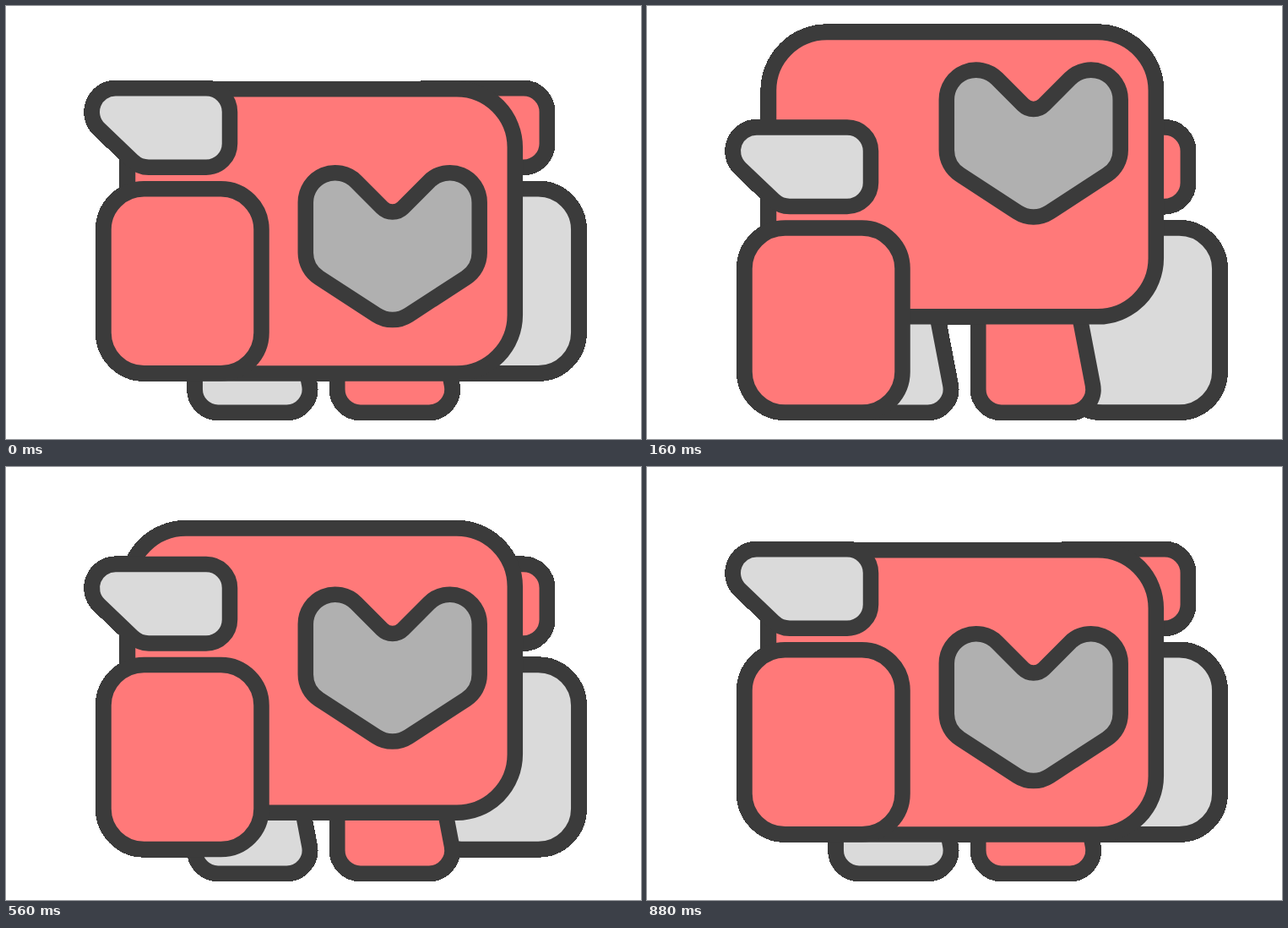
Write an HTML page that moves like this. It is 752x512 px and loops after 1000 ms.

```html
<!DOCTYPE html>
<html lang="en">
<head>
<meta charset="utf-8">
<title>Robot squash and stretch</title>
<style>
  html, body { margin: 0; width: 100%; height: 100%; overflow: hidden; background: #fff; }
  svg { display: block; width: 100vw; height: 100vh; }
</style>
</head>
<body>
<svg viewBox="0 0 752 512">
  <!-- Hard outer silhouette, smooth inner edges -->
  <filter id="hardEdge" filterUnits="userSpaceOnUse" x="0" y="0" width="752" height="512"
          color-interpolation-filters="sRGB">
    <feComponentTransfer><feFuncA type="linear" slope="20" intercept="-1.5"/></feComponentTransfer>
  </filter>
  <g id="robot" filter="url(#hardEdge)" stroke="#3b3b3b" stroke-width="18.5"></g>
</svg>
<script>
const RED = '#ff7979', LIGHT = '#dadada', MID = '#b0b0b0';
const LOOP = 1000, STEP = 40, RELEASE = 513;
const DAMPING = .028, SWING = .0245;

const robot = document.getElementById('robot');
const groups = [];

const svg = name => document.createElementNS(robot.namespaceURI, name);

function toward(from, to) {
  const dx = to[0] - from[0], dy = to[1] - from[1], d = Math.hypot(dx, dy);
  return [dx / d, dy / d];
}

// Closed path through points [x, y, radius?] with rounded corners
function roundPath(points, radius) {
  const n = points.length;
  return points.map((p, i) => {
    const a = toward(p, points[(i + n - 1) % n]);
    const b = toward(p, points[(i + 1) % n]);
    const r = p[2] ?? radius;
    const cut = r / Math.tan(Math.acos(a[0] * b[0] + a[1] * b[1]) / 2);
    const at = u => `${p[0] + u[0] * cut} ${p[1] + u[1] * cut}`;
    const sweep = a[0] * b[1] < a[1] * b[0] ? 1 : 0;
    return `${i ? 'L' : 'M'}${at(a)}A${r} ${r} 0 0 ${sweep} ${at(b)}`;
  }).join('') + 'Z';
}

const box = (x, y, w, h) => [[x, y], [x + w, y], [x + w, y + h], [x, y + h]];
const arm = x => box(x, 216.3, 187, 218);
const leg = x => [[x, 335, 0], [x + 113.9, 335, 0], [x + 141.9, 480.7], [x, 480.7]];

function heart(cx, half, top, side, tip) {
  return [
    [cx - half, top], [cx, top + half, 17.3], [cx + half, top],
    [cx + half, side], [cx, tip], [cx - half, side]
  ];
}

// travel: vertical move in pixels from squashed to stretched
function group(travel, ...shapes) {
  const g = svg('g');
  for (const [points, radius, fill] of shapes) {
    const path = svg('path');
    path.setAttribute('d', roundPath(points, radius));
    path.setAttribute('fill', fill);
    g.append(path);
  }
  robot.append(g);
  groups.push({ g, travel });
}

const visor = [[59.8, 97.3], [265, 97.3], [265, 190.7], [157.8, 190.7]];

group(45.5, [box(471, 97.3, 169.8, 93.4), 28, RED], [arm(491.3), 48, LIGHT]);
group(0, [leg(223.7), 27.5, LIGHT], [leg(392.3), 27.5, RED]);
group(-66, [box(144, 98.2, 458.8, 336.3), 69, RED]);
group(-119.5, [heart(457.75, 102.95, 147.7, 310.8, 377.8), 35, MID]);
group(45.5, [visor, 28, LIGHT], [arm(115.5), 48, RED]);

// Damped spring from 0 to 1 with a slight overshoot
function spring(t) {
  if (t <= 0) return 0;
  const a = SWING * t;
  return 1 - Math.exp(-DAMPING * t) * (Math.cos(a) + DAMPING / SWING * Math.sin(a));
}

function draw(time) {
  const t = Math.floor(time / STEP) * STEP;
  const stretch = spring(t) - spring(t - RELEASE);
  for (const { g, travel } of groups) {
    g.setAttribute('transform', `translate(0 ${(travel * stretch).toFixed(2)})`);
  }
}

let start;
function tick(now) {
  start ??= now;
  draw((now - start) % LOOP);
  requestAnimationFrame(tick);
}
draw(0);
requestAnimationFrame(tick);
</script>
</body>
</html>
```
